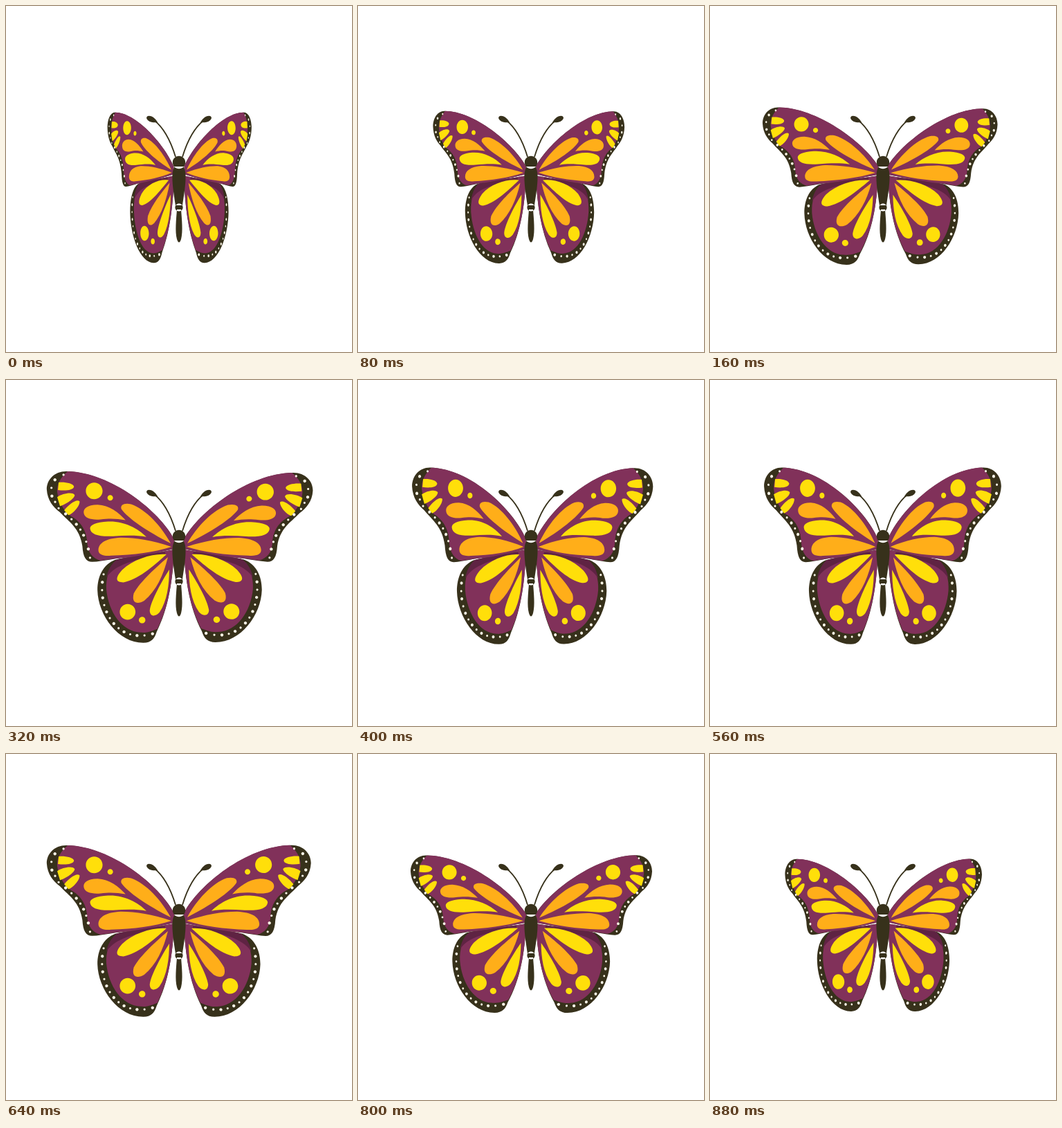
Recreate the animation shown at these times as an HTML page with a canvas. Size 500 px wide and 500 px high, loop 960 ms.

```html
<!DOCTYPE html>
<html lang="en">
<head>
<meta charset="utf-8">
<title>Butterfly</title>
<style>
  html, body { margin: 0; width: 100%; height: 100%; overflow: hidden; background: #fff; }
  canvas { display: block; width: 500px; height: 500px; }
</style>
</head>
<body>
<canvas id="stage" width="500" height="500"></canvas>
<script>
const ctx = document.getElementById('stage').getContext('2d');
const DARK = '#37311b', PURPLE = '#81315a', SHADE = '#5f2343';
const YELLOW = '#ffdf0a', ORANGE = '#ffae19', PALE = '#fbf6e6';

const STEP = 80, STEPS = 12;

// Circle as path text, so that it bends with the wing
function dot(x, y, r) {
  const k = r * 0.5523;
  return `M${x - r} ${y}C${x - r} ${y - k} ${x - k} ${y - r} ${x} ${y - r}` +
    `C${x + k} ${y - r} ${x + r} ${y - k} ${x + r} ${y}` +
    `C${x + r} ${y + k} ${x + k} ${y + r} ${x} ${y + r}` +
    `C${x - k} ${y + r} ${x - r} ${y + k} ${x - r} ${y}Z`;
}

// Evenly spaced dots of alternating size along a cubic curve
function beads(count, ...curve) {
  const at = (t, axis) => {
    const u = 1 - t, [p, q, r, s] = curve.map(point => point[axis]);
    return u * u * u * p + 3 * u * u * t * q + 3 * u * t * t * r + t * t * t * s;
  };
  let path = '';
  for (let i = 0; i < count; i++) {
    const t = i / (count - 1);
    path += dot(at(t, 0), at(t, 1), i % 2 ? 2.2 : 1.6);
  }
  return path;
}

// A flap turns from 0 (folded) to PI (raised). Relative to the root:
//   x' = wide x + curl x^2 / 100,  y' = tilt x + tall y
const upper = {
  root: [241, 240],
  pose: f => ({
    wide: .69 + .39 * Math.sin(f) + .03 * Math.sin(2 * f),
    curl: .038 + .055 * Math.cos(f) + .015 * Math.sin(2 * f),
    tilt: -.004 - .013 * Math.cos(f),
    tall: .948 - .117 * Math.cos(f)
  }),
  shapes: [
    [DARK, 'M243 230C222 190 152 134 88 133C71 133 60 145 60 159C61 175 69 184 79 192C92 206 107 214 111 240C112 256 116 263 125 263C142 262 160 257 180 256C205 252 225 248 243 244Z'],
    [PURPLE, 'M243 230C222 190 152 134 90 133C80 141 74 152 75 163C77 178 84 188 92 196C106 203 117 215 118 236C119 250 126 258 137 261C152 259 166 257 180 256C205 252 225 248 243 244Z'],
    [ORANGE, 'M239 241C212 232 188 228 166 228C145 229 134 236 134 246C134 252 140 255 152 254C185 253 215 249 239 241Z' +
      'M173 203C163 192 150 182 133 181C118 181 112 187 113 193C114 201 125 203 137 202C152 200 161 201 173 203Z' +
      'M238 236C225 212 202 187 181 180C171 178 165 181 167 187C176 200 204 219 238 236Z'],
    [YELLOW, 'M203 227C190 214 170 204 148 205C130 206 122 210 122 215C123 224 135 227 155 226C172 225 188 224 203 227Z' +
      'M77 149C85 148 98 150 99 155C98 161 85 161 76 160Z' +
      'M75 170C82 165 97 162 100 167C100 172 88 180 79 183Z' +
      'M85 189C92 180 103 172 107 176C108 182 98 194 91 196Z' +
      dot(128, 161, 12) + dot(151, 171, 4)],
    [PALE, beads(5, [84, 138], [62, 143], [64, 170], [72, 177]) +
      beads(9, [77, 186], [106, 209], [116, 221], [122, 257])]
  ]
};

const lower = {
  root: [243, 250],
  pose: f => ({
    wide: .74 + .36 * Math.sin(f) + .046 * Math.sin(2 * f),
    curl: .065 + .085 * Math.cos(f) + .012 * Math.sin(2 * f),
    tilt: .018 * Math.cos(f),
    tall: .976 - .038 * Math.cos(f)
  }),
  shapes: [
    [DARK, 'M243 245C215 250 175 255 158 259C140 266 132 283 132 303C133 340 163 380 199 380C210 380 215 374 218 364C235 330 241 290 243 245Z'],
    [PURPLE, 'M243 245C215 250 175 255 160 259C149 270 144 286 145 302C148 335 168 364 195 365C206 366 213 362 219 360C235 328 241 290 243 245Z'],
    [SHADE, 'M230 248C200 252 172 256 160 259C151 266 147 275 145 285C155 270 175 260 230 252Z'],
    [YELLOW, 'M232 252C213 250 185 258 168 274C157 286 159 292 170 292C191 288 211 271 232 252Z' +
      'M236 274C226 290 210 318 208 333C208 342 216 343 222 336C233 320 236 295 236 274Z' +
      dot(176, 335, 11.4) + dot(197, 347, 4.7)],
    [ORANGE, 'M234 256C218 270 194 291 185 308C181 322 190 325 200 319C217 305 228 282 234 256Z'],
    [PALE, beads(14, [141, 280], [130, 330], [160, 382], [212, 367])]
  ]
};

const body = new Path2D(
  dot(250, 226, 9.2) + dot(250, 291, 5.6) +
  'M244 232C237 240 242 268 245 288L255 288C258 268 263 240 256 232Z' +
  'M247 294C246 308 244 326 247 337C249 343 251 343 253 337C256 326 254 308 253 294Z');
const stalk = new Path2D('M245 218C238 195 228 176 214 165');
const club = new Path2D('M203 162C203 156 214 158 219 168C213 169 205 168 203 162Z');

function drawWing({ root: [rx, ry], pose, shapes }, flap) {
  const { wide, curl, tilt, tall } = pose(flap);
  const bend = (_, px, py) => {
    const x = px - rx, y = py - ry;
    return `${(rx + wide * x + curl * x * x / 100).toFixed(2)} ${(ry + tilt * x + tall * y).toFixed(2)}`;
  };
  for (const [color, path] of shapes) {
    ctx.fillStyle = color;
    ctx.fill(new Path2D(path.replace(/([\d.]+) ([\d.]+)/g, bend)));
  }
}

function drawHalf(turn, mirrored) {
  const flap = Math.acos(Math.cos(turn)); // up, then back the same way
  ctx.save();
  if (mirrored) ctx.transform(-1, 0, 0, 1, 500, 0);
  drawWing(lower, flap);
  drawWing(upper, flap);
  ctx.strokeStyle = ctx.fillStyle = DARK;
  ctx.lineWidth = 1.8;
  ctx.stroke(stalk);
  ctx.fill(club);
  ctx.restore();
}

function draw(step) {
  const turn = step / STEPS * 2 * Math.PI;
  // The right wing trails the left one while rising
  const lag = Math.max(.02, .18 * Math.sin(turn));
  ctx.fillStyle = '#fff';
  ctx.fillRect(0, 0, 500, 500);
  drawHalf(turn, false);
  drawHalf(turn - lag, true);
  ctx.fillStyle = DARK;
  ctx.fill(body);
}

let shown = 0, start;
function tick(now) {
  start ??= now;
  const step = Math.floor((now - start) / STEP) % STEPS;
  if (step !== shown) draw(shown = step);
  requestAnimationFrame(tick);
}
draw(0);
requestAnimationFrame(tick);
</script>
</body>
</html>
```
